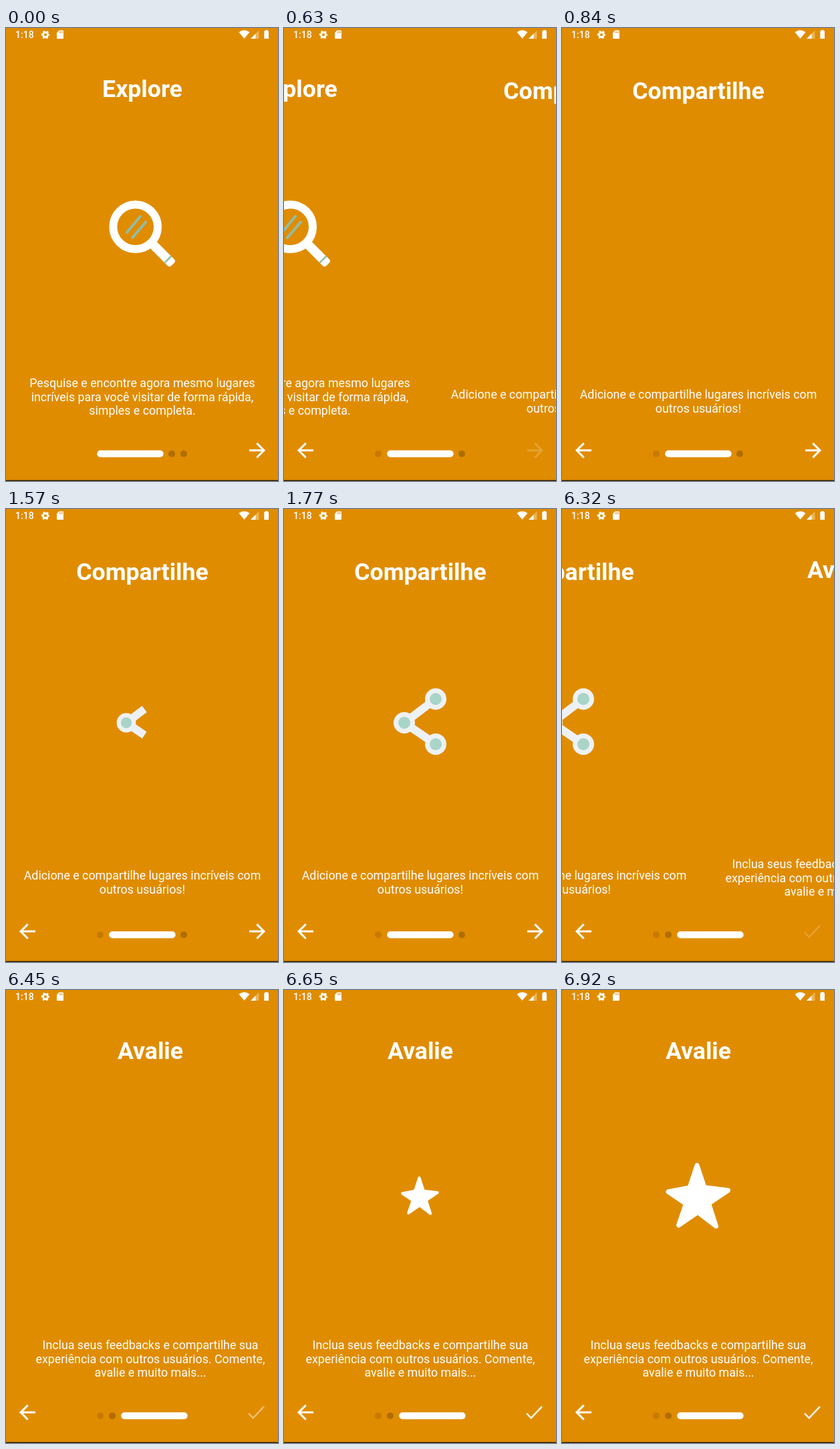
Write an HTML page that moves like this. It is 407 px wide and 676 px high and loops after 8 s.

```html
<!DOCTYPE html>
<html lang="pt">
<head>
<meta charset="utf-8">
<title>Onboarding</title>
<style>
  html, body { margin: 0; width: 100%; height: 100%; overflow: hidden; background: #e08c00; }
  svg { display: block; font-family: Roboto, sans-serif; }
  text { fill: #fff; }
  .page text { text-anchor: middle; font-size: 17.82px; }
  .page .title { font-size: 35.64px; font-weight: 700; }
</style>
</head>
<body>
<svg width="407" height="676" viewBox="0 0 407 676">
  <rect width="407" height="676" fill="#e08c00"/>

  <g class="page">
    <text class="title" x="204" y="103">Explore</text>
    <g transform="translate(193.7 296.8)">
      <g transform="rotate(45)">
        <rect x="36" y="-7" width="43" height="14" rx="4" fill="#fff"/>
        <rect x="67.5" y="-7" width="2.6" height="14" fill="#93bfa9"/>
      </g>
      <circle r="33.3" fill="none" stroke="#fff" stroke-width="12"/>
      <path d="M-12.7 8.2L7.3-15.8M-4.7 16.2L15.3-7.3" stroke="#8fbda8" stroke-width="4" stroke-linecap="round"/>
    </g>
    <text x="204" y="536">Pesquise e encontre agora mesmo lugares</text>
    <text x="204" y="557">incríveis para você visitar de forma rápida,</text>
    <text x="204" y="577">simples e completa.</text>
  </g>

  <g class="page">
    <text class="title" x="204" y="106">Compartilhe</text>
    <g id="links" stroke="#eef1f3" stroke-width="12">
      <path d="M180 319L227 283.5" pathLength="1" stroke-dasharray="1 2"/>
      <path d="M180 319L227 351" pathLength="1" stroke-dasharray="1 2"/>
    </g>
    <g id="nodes"></g>
    <text x="204" y="553">Adicione e compartilhe lugares incríveis com</text>
    <text x="204" y="574">outros usuários!</text>
  </g>

  <g class="page">
    <text class="title" x="204" y="103">Avalie</text>
    <path id="star" fill="#fff" stroke="#fff" stroke-width="7" stroke-linejoin="round"
      d="M202 261.5L213 294.5 248.5 299 219.5 318.5 230.5 352.5 203 331.5 174.5 351 185.5 319 159 301 191 295Z"/>
    <text x="204" y="536">Inclua seus feedbacks e compartilhe sua</text>
    <text x="204" y="557">experiência com outros usuários. Comente,</text>
    <text x="204" y="577">avalie e muito mais...</text>
  </g>

  <g id="dots"></g>
  <rect id="bar" y="630.2" width="99.5" height="10.2" rx="5.1" fill="#fff"/>

  <g fill="none" stroke="#fff" stroke-width="3">
    <path id="back" d="M44 630.3H22.5M32.7 619.6L22 630.3 32.7 641"/>
    <path id="next" d="M364 630.3H385.5M375.3 619.6L386 630.3 375.3 641"/>
    <path id="done" d="M363 631.7L369.7 638.8 386 621.6" stroke-width="2.4"/>
  </g>

  <text x="14" y="15" font-size="14" font-weight="500">1:18</text>
  <g fill="none" stroke="#fff">
    <circle cx="59" cy="10" r="3.5" stroke-width="2.8"/>
    <circle cx="59" cy="10" r="5.2" stroke-width="2.2" stroke-dasharray="2.7 2.745" stroke-dashoffset="1.35"/>
  </g>
  <path fill="#fff" d="M79.5 3.5H85Q86 3.5 86 4.5V15Q86 16 85 16H77Q76 16 76 15V7Z"/>
  <path stroke="#e08c00" d="M80.5 5V7.5M82.5 5V7.5M84.5 5V7.5"/>
  <path fill="#fff" d="M348.5 6.3Q356.5 0 364.5 6.3L356.5 15.8Z"/>
  <path fill="#fff" opacity=".35" d="M378.5 3.5V16H366Z"/>
  <path fill="#fff" d="M373.5 8.5V16H366Z"/>
  <path fill="#fff" d="M388 4.3V3H391.5V4.3H393V16H386.3V4.3Z"/>
  <rect y="674.7" width="407" height="1.3" fill="#1c1408"/>
</svg>
<script>
const LOOP = 8000, WIDTH = 407;
// Screen refresh times; the picture holds between them.
const TICKS = [0, 500, 630, 700, 770, 840, 1500, 1570, 1630, 1700, 1770,
  6190, 6320, 6390, 6450, 6520, 6580, 6650, 6720, 6790, 6850, 6920];
const TAPS = [
  { down: 500, slide: 588, release: 630, fade: 210 },
  { down: 6190, slide: 6275, release: 6350, fade: 250 }
];

const $ = id => document.getElementById(id);
const pages = [...document.querySelectorAll('.page')];
const links = [...$('links').children];

function circle(parent, cx, cy, r, fill) {
  const c = document.createElementNS('http://www.w3.org/2000/svg', 'circle');
  Object.entries({ cx, cy, r, fill }).forEach(([k, v]) => c.setAttribute(k, v));
  parent.append(c);
  return c;
}

const dots = [141, 159, 248, 266].map((x, i) =>
  circle($('dots'), x, 635.4, 5, i ? '#b06e00' : '#c67b00'));
const nodes = [[180, 319], [227, 283.5], [227, 351]].map(([x, y]) =>
  [circle($('nodes'), x, y, 16, '#eef1f3'), circle($('nodes'), x, y, 9, '#a9d4c8')]);

const ramp = (t, start, length) => Math.min(1, Math.max(0, (t - start) / length));
const easeOut = (p, n) => 1 - (1 - p) ** n;
const easeInOut = p => p < .5 ? 2 * p * p : 1 - 2 * (1 - p) ** 2;
const show = (el, on) => el.setAttribute('visibility', on ? 'visible' : 'hidden');

function grow(el, x, y, s) {
  show(el, s > 0);
  el.setAttribute('transform', `translate(${x} ${y}) scale(${s}) translate(${-x} ${-y})`);
}

function drawShare(t) {
  const line = easeOut(ramp(t, 1500, 200), 2);
  links.forEach(l => {
    show(l, line > 0);
    l.setAttribute('stroke-dashoffset', 1 - line);
  });
  nodes.forEach(([rim, core], i) => {
    const s = easeOut(i ? ramp(t, 1580, 190) : ramp(t, 1440, 190), 2);
    rim.setAttribute('r', 16 * s);
    core.setAttribute('r', 9 * s);
  });
}

function draw(t) {
  const scroll = TAPS.reduce((sum, tap) => sum + easeOut(ramp(t, tap.slide, 300), 4), 0);
  const page = TAPS.filter(tap => t >= tap.slide).length;
  pages.forEach((p, i) =>
    p.setAttribute('transform', `translate(${Math.round((i - scroll) * WIDTH)})`));

  $('bar').setAttribute('x', 136.2 + 18 * page);
  dots.forEach((d, i) => show(d, i < 2 ? i < page : i - 1 > page));

  const tap = TAPS.findLast(tap => t >= tap.down);
  const alpha = tap ? .2 + .8 * easeInOut(ramp(t, tap.release, tap.fade)) : 1;
  $('next').setAttribute('opacity', alpha);
  $('done').setAttribute('opacity', alpha);
  show($('back'), page > 0);
  show($('next'), page < 2);
  show($('done'), page === 2);

  drawShare(t);
  grow($('star'), 203, 307, easeOut(ramp(t, 6500, 420), 2));
}

const origin = performance.now();
function frame() {
  const t = (performance.now() - origin) % LOOP;
  draw(TICKS.findLast(tick => tick <= t) ?? 0);
  requestAnimationFrame(frame);
}
frame();
</script>
</body>
</html>
```
